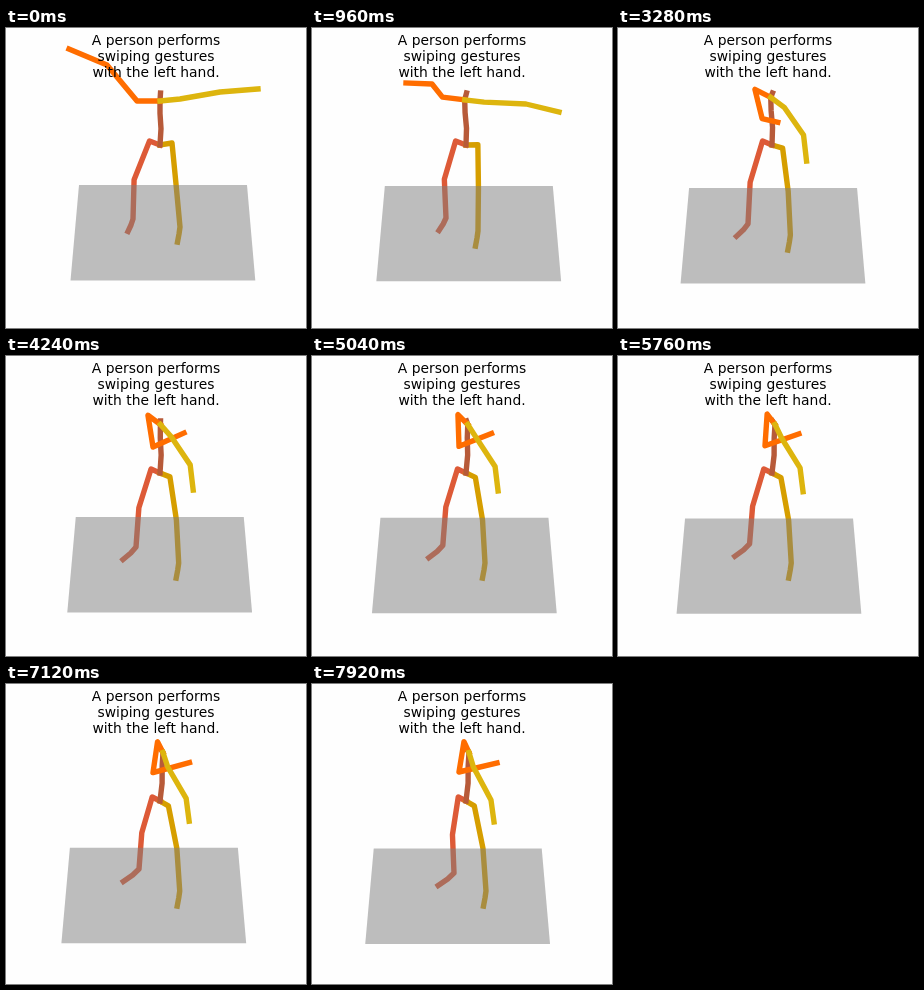
An HTML page for the animation above (8000 ms loop, 300x300 px).

```html
<!DOCTYPE html>
<html lang="en">
<head>
<meta charset="utf-8">
<title>Swiping figure</title>
<style>
  html, body { margin: 0; width: 100%; height: 100%; overflow: hidden; background: #fefefe; }
  svg { display: block; width: 100%; height: 100%; }
  polyline { fill: none; stroke-width: 5.4; stroke-linecap: square; stroke-linejoin: round; }
  text { font: 13.89px "DejaVu Sans", sans-serif; text-anchor: middle; }
</style>
</head>
<body>
<svg viewBox="0 0 300 300">
  <polyline id="rightLeg" stroke="#dd5a37"/>
  <polyline id="leftLeg" stroke="#d69e00"/>
  <polyline id="spine" stroke="#b75a39"/>
  <polyline id="rightArm" stroke="#ff6d00"/>
  <polyline id="leftArm" stroke="#ddb50e"/>
  <polygon id="floor" fill="#7f7f7f" fill-opacity=".5"/>
  <text x="150" y="17">A person performs</text>
  <text x="150" y="33">swiping gestures</text>
  <text x="150" y="49">with the left hand.</text>
</svg>
<script>
const LOOP = 8000, STEP = 80;
const { sin, cos, PI } = Math;
const pelvis = [154, 117], head = [154.5, 65];

// Key points: time, then x and y of elbow and wrist, or of one joint
const rightReach = [
  [0, 101, 37, 63, 21], [960, 120, 56, 94, 55], [2240, 141, 90, 140, 113],
  [4240, 147, 91, 178, 77], [7920, 147, 88, 185, 79]
];
const leftReach = [
  [0, 214, 64, 252, 61], [960, 214, 76, 247, 84],
  [2240, 187, 105, 190, 132], [7920, 179, 116, 182, 138]
];
const rightStep = [
  [0, 127, 191], [960, 134, 190], [2240, 130, 201],
  [4240, 130, 191], [7120, 133, 185], [7920, 142, 189]
];
const leftStep = [[0, 174, 199], [960, 166, 203], [2240, 172, 207], [7920, 174, 207]];
const sway = [[0, 154], [2240, 151], [5760, 157], [7920, 157]];

const add = ([x, y], dx, dy) => [x + dx, y + dy];
const mix = (a, b, k) => a.map((v, i) => v + (b[i] - v) * k);

function at(track, t) {
  const next = Math.max(1, track.findIndex(key => key[0] >= t));
  const [a, b] = [track[next - 1], track[next]];
  return mix(a, b, (t - a[0]) / (b[0] - a[0])).slice(1);
}

function leg(hip, ankle, bend, toeX, toeY) {
  const toe = add(ankle, toeX, toeY);
  const knee = add(mix(hip, ankle, 0.51), bend, -1);
  const heel = add(mix(ankle, toe, 0.4), 0, 1);
  return [pelvis, hip, knee, ankle, heel, toe];
}

function setPoints(id, points) {
  document.getElementById(id).setAttribute("points", points.flat().map(v => v.toFixed(2)).join(" "));
}

function draw(now) {
  const t = Math.floor(now % LOOP / STEP) * STEP;
  const u = t / LOOP;

  // The body slowly turns side-on, carrying shoulders and hips round
  const turn = 1.35 * sin(PI / 2 * u);
  const neck = [at(sway, t)[0], 73 - 4.5 * Math.min(1, turn)];
  setPoints("spine", [
    pelvis, add(mix(pelvis, neck, 0.37), 1, 0), mix(pelvis, neck, 0.72), neck, head
  ]);

  const rightHip = add(pelvis, -10.5 * cos(0.55 * turn), -4);
  const leftHip = add(pelvis, 12 * cos(0.6 * turn), 7 * sin(turn) - 2);
  setPoints("rightLeg", leg(rightHip, at(rightStep, t), 2.5 * turn - 7, -5 - 8 * turn, 12.5));
  setPoints("leftLeg", leg(leftHip, at(leftStep, t), 2 * turn, -2.5, 15));

  // One quick outward swipe around 3840 ms
  const swipe = cos(PI / 2 * Math.min(1, Math.abs(t - 3840) / 360));
  const rightShoulder = add(neck, -23 * cos(turn) + 13 * swipe, -11 * sin(turn));
  const leftShoulder = add(neck, 20 * cos(turn), 17 * sin(turn) - 2);
  const [ex, ey, wx, wy] = at(rightReach, t);
  setPoints("rightArm", [
    neck, rightShoulder, add([ex, ey], 57 * swipe, -40 * swipe), add([wx, wy], 77 * swipe, -38 * swipe)
  ]);
  setPoints("leftArm", [neck, leftShoulder, at(leftReach, t)]);

  // The view drifts, so the floor slides left and down
  const x = 73 - 11.5 * u * u, far = 157 + 7.6 * u, near = far + 95.4;
  setPoints("floor", [x, far, x + 168, far, x + 176.3, near, x - 8.5, near]);
}

const start = performance.now();
function tick() {
  draw(performance.now() - start);
  requestAnimationFrame(tick);
}
tick();
</script>
</body>
</html>
```
